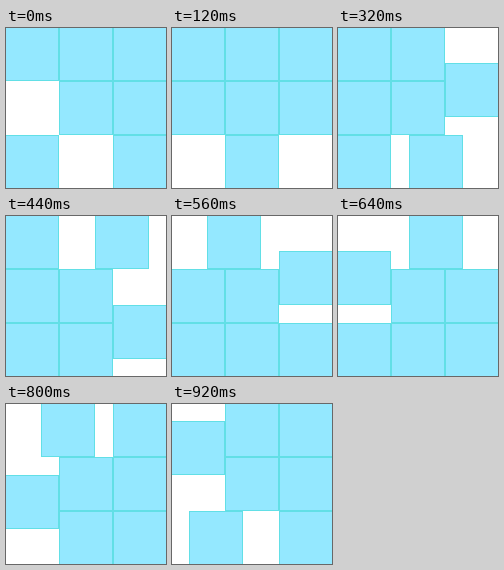
An HTML page with a canvas for the animation above (0.96 s loop, 160x160 px).

```html
<!DOCTYPE html>
<html lang="en">
<head>
<meta charset="utf-8">
<title>Sliding tiles</title>
<style>
  html, body { margin: 0; width: 100%; height: 100%; overflow: hidden; background: #fff; }
  canvas { display: block; width: 160px; height: 160px; }
</style>
</head>
<body>
<canvas id="stage" width="160" height="160"></canvas>
<script>
const ctx = document.getElementById('stage').getContext('2d');
const PITCH = 54, ORIGIN = -1, STEP = 40, STEPS_PER_MOVE = 3;

// Outer cells as [column, row], in the order the two holes travel.
const ring = [[0, 1], [0, 2], [1, 2], [2, 2], [2, 1], [2, 0], [1, 0], [0, 0]];
const cell = i => ring[i % ring.length];

function drawTile(col, row) {
  const x = ORIGIN + col * PITCH, y = ORIGIN + row * PITCH;
  ctx.fillRect(x, y, PITCH, PITCH);
  ctx.strokeRect(x + 0.5, y + 0.5, PITCH - 1, PITCH - 1);
}

function draw(time) {
  const step = Math.floor(time / STEP) % (ring.length * STEPS_PER_MOVE);
  const hole = Math.floor(step / STEPS_PER_MOVE);
  const progress = step % STEPS_PER_MOVE / STEPS_PER_MOVE;

  ctx.clearRect(0, 0, 160, 160);
  ctx.fillStyle = '#94e8ff';
  ctx.strokeStyle = '#62dfe6';
  drawTile(1, 1);
  for (const offset of [1, 3, 4, 5, 6, 7]) {
    // The tile just ahead of each hole slides back into it.
    const p = offset <= 3 ? progress : 0;
    const [c0, r0] = cell(hole + offset);
    const [c1, r1] = cell(hole + offset - 1);
    drawTile(c0 + (c1 - c0) * p, r0 + (r1 - r0) * p);
  }
}

const start = performance.now();
function tick() {
  draw(performance.now() - start);
  requestAnimationFrame(tick);
}
tick();
</script>
</body>
</html>
```
